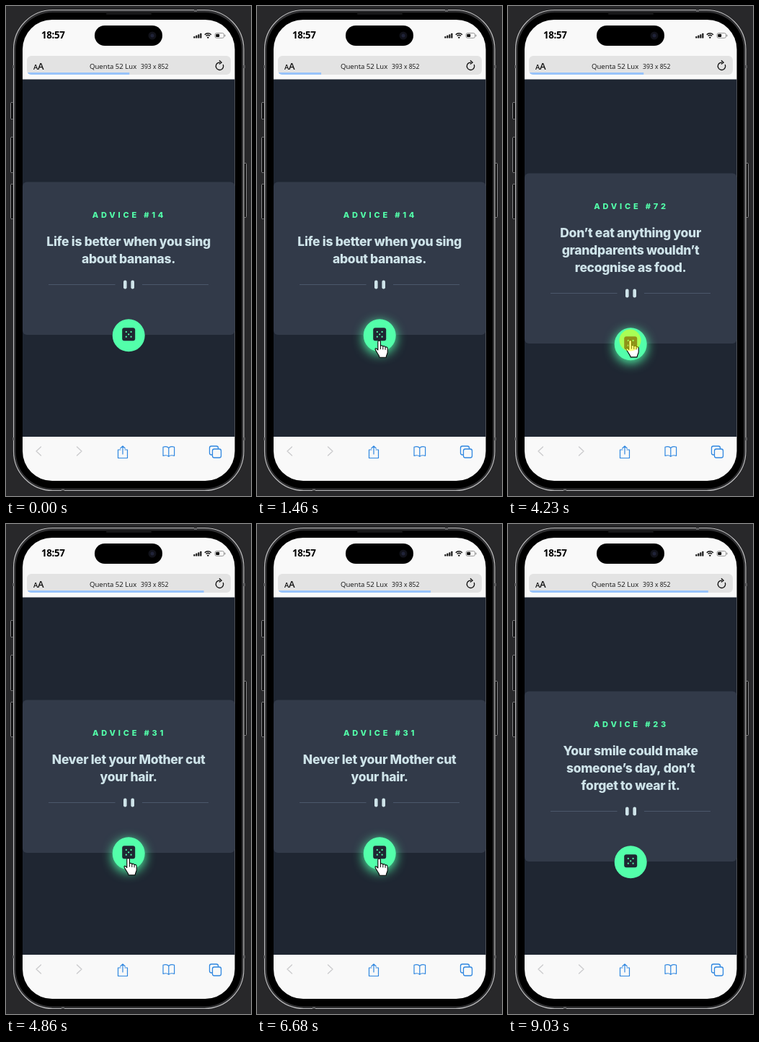
These frames come from a looping animation (340 by 678 pixels, 9100 ms). An HTML page with a canvas:

```html
<!DOCTYPE html>
<html lang="en">
<head>
<meta charset="utf-8">
<title>Advice generator on a phone</title>
<style>
html, body { margin: 0; width: 100%; height: 100%; overflow: hidden; background: #28282a; }
canvas { display: block; width: 340px; height: 678px; }
</style>
</head>
<body>
<canvas id="stage"></canvas>
<script>
const W = 340, H = 678, LOOP = 9100;
const canvas = document.getElementById('stage');
const ctx = canvas.getContext('2d');
const dpr = window.devicePixelRatio || 1;
canvas.width = W * dpr;
canvas.height = H * dpr;

const GREEN = '#53ffaa', PALE = '#cee3e9', NIGHT = '#1f2632', BLUE = '#2f87e0';

const SLIPS = [
  { at: 0, id: 14, lines: ['Life is better when you sing', 'about bananas.'] },
  { at: 2310, id: 72, lines: ['Don’t eat anything your', 'grandparents wouldn’t', 'recognise as food.'] },
  { at: 4480, id: 31, lines: ['Never let your Mother cut', 'your hair.'] },
  { at: 7040, id: 23, lines: ['Your smile could make', 'someone’s day, don’t', 'forget to wear it.'] }
];
const CLICKS = [2000, 4160, 6830];
const CLICK_MS = 200;

// Loading bar: start times and speed in px per ms
const LOADS = [-1030, 1030, 3076, 5140, 7222];
const LOAD_SPEED = 0.137;

// Pointer keys: time, x, y
const PATH = [
  [210, 303, 601], [860, 169.5, 463], [4880, 169.5, 462.5], [5350, 223, 480],
  [5700, 223, 480], [6250, 169.5, 463], [7090, 169.5, 463], [7290, 219, 480],
  [7800, 219, 480], [8330, 296, 679]
];

const last = (list, test) => list.filter(test).pop();
const ease = p => p * p * (3 - 2 * p);

function pointerAt(t) {
  for (let i = 1; i < PATH.length; i++) {
    const [t0, x0, y0] = PATH[i - 1], [t1, x1, y1] = PATH[i];
    if (t >= t0 && t < t1) {
      const p = ease((t - t0) / (t1 - t0));
      return { x: x0 + (x1 - x0) * p, y: y0 + (y1 - y0) * p };
    }
  }
  return null;
}

function box(x, y, w, h, r, fill, stroke, width = 1) {
  ctx.beginPath();
  ctx.roundRect(x, y, w, h, r);
  paint(fill, stroke, width);
}

function disc(x, y, r, fill) {
  ctx.beginPath();
  ctx.arc(x, y, r, 0, Math.PI * 2);
  paint(fill);
}

function shape(d, fill, stroke, width = 1) {
  const path = new Path2D(d);
  if (fill) { ctx.fillStyle = fill; ctx.fill(path); }
  if (stroke) { ctx.strokeStyle = stroke; ctx.lineWidth = width; ctx.stroke(path); }
}

function paint(fill, stroke, width) {
  if (fill) { ctx.fillStyle = fill; ctx.fill(); }
  if (stroke) { ctx.strokeStyle = stroke; ctx.lineWidth = width; ctx.stroke(); }
}

function text(str, x, y, font, color, align = 'left', spacing = 0) {
  ctx.font = font;
  ctx.fillStyle = color;
  ctx.textAlign = align;
  ctx.letterSpacing = spacing + 'px';
  ctx.fillText(str, x, y);
  ctx.letterSpacing = '0px';
}

function drawBody() {
  ctx.fillStyle = '#28282a';
  ctx.fillRect(0, 0, W, H);
  for (const [x, y, h] of [[6.5, 133.5, 23], [6.5, 181.5, 49], [6.5, 246.5, 48], [329.5, 217.5, 75]])
    box(x, y, 4, h, 1, '#0c0c0d', '#8a8a8c');
  box(9.5, 4.5, 321.5, 667, 55.5, '#111');
  box(10.5, 5.5, 319.5, 665, 54.5, '#303032', '#bdbdbf', 1.2);
  box(13.5, 9, 313.5, 658.5, 51, '#000');
  ctx.fillStyle = '#5a5a5c';
  for (const [x, y] of [[9, 82], [9, 597], [329, 82], [329, 597]]) ctx.fillRect(x, y, 3, 4);
  ctx.fillRect(261, 5, 4, 3);
  ctx.fillRect(77, 668, 4, 3);
  box(139, 10, 63, 1.5, 0.7, '#252527');
  box(23, 19, 294.5, 638, 41, '#f9f9f9');
}

function drawStatus() {
  text('18:57', 49, 45, 'bold 13.3px "Open Sans", sans-serif', '#000', 'left', -0.3);
  box(123, 27, 94, 28, 14, '#000');
  disc(203, 41, 5.5, '#11121a');
  disc(203, 41, 2.5, '#202338');
  for (let i = 0; i < 4; i++) box(260.3 + i * 3, 42 - i * 1.4, 2.1, 2.6 + i * 1.4, 0.5, '#111');
  ctx.lineWidth = 1.5;
  ctx.strokeStyle = '#111';
  for (const r of [6.2, 3.7]) {
    ctx.beginPath();
    ctx.arc(280.3, 44, r, -Math.PI * 0.76, -Math.PI * 0.24);
    ctx.stroke();
  }
  disc(280.3, 43.6, 1.2, '#111');
  box(290, 37.5, 12.5, 6.8, 2.2, null, '#8c8c8c', 0.9);
  box(291.2, 38.7, 5, 4.4, 1, '#111');
  box(303.4, 39.6, 1.1, 2.6, 0.5, '#8c8c8c');
}

function drawAddress(t) {
  box(29, 69, 283, 26, 6, '#e3e3e3');
  ctx.save();
  ctx.beginPath();
  ctx.roundRect(29, 69, 283, 26, 6);
  ctx.clip();
  ctx.fillStyle = '#98c3fa';
  ctx.fillRect(30, 92, (t - last(LOADS, s => s <= t)) * LOAD_SPEED, 3);
  ctx.restore();
  text('A', 38, 87.5, '600 9.5px "Open Sans", sans-serif', '#111');
  text('A', 44, 87.5, '600 13px "Open Sans", sans-serif', '#111');
  text('Quenta 52 Lux', 116, 87, '9.6px "Open Sans", sans-serif', '#111');
  text('393 x 852', 187, 87, '8.6px "Open Sans", sans-serif', '#111');
  ctx.beginPath();
  ctx.arc(296.5, 83.3, 5.2, -0.45, Math.PI * 1.55);
  paint(null, '#111', 1.3);
  shape('M296 75.2 L299.2 78.2 L295.8 80.6', null, '#111', 1.2);
}

function drawToolbar() {
  ctx.save();
  ctx.translate(0, -0.5);
  ctx.lineJoin = ctx.lineCap = 'round';
  shape('M48.5 610.5 L42 616.5 L48.5 622.5 M98.5 610.5 L105 616.5 L98.5 622.5', null, '#cbcbcd', 1.3);
  shape('M159 614.5 H155.5 V626 H168.5 V614.5 H165 M162 620.5 V609.5 M158.8 612.5 L162 609.3 L165.2 612.5', null, BLUE, 1.2);
  shape('M225.8 612 C224 610 220.5 610 218 610.8 V622.8 C221 622 224 622 225.8 623.8 C227.6 622 230.6 622 233.6 622.8 V610.8 C231 610 227.6 610 225.8 612 V623.5', null, BLUE, 1.2);
  box(282.5, 609.5, 12, 12, 2.5, null, BLUE, 1.3);
  box(286.5, 613.5, 12, 12, 2.5, '#f9f9f9', BLUE, 1.3);
  ctx.restore();
}

function drawButton(cy, hover) {
  ctx.save();
  if (hover) {
    ctx.shadowColor = GREEN;
    ctx.shadowBlur = 15 * dpr;
    ctx.shadowOffsetY = 3.5 * dpr;
  }
  disc(170.2, cy, 22.5, GREEN);
  ctx.restore();
  box(161.2, cy - 10.5, 18, 18, 3, NIGHT);
  for (const [dx, dy] of [[0, 0], [-1, -1], [1, -1], [-1, 1], [1, 1]])
    disc(170.2 + dx * 3.4, cy - 1.5 + dy * 3.4, 1.1, GREEN);
}

function drawCard(t, pointer) {
  ctx.fillStyle = NIGHT;
  ctx.fillRect(23, 101.5, 294.5, 494.5);
  const slip = last(SLIPS, s => s.at <= t);
  const rows = slip.lines.length;
  const top = 267.5 - rows * 12, height = 163.5 + rows * 24;
  const cy = top + height + 0.8;
  box(23, top, 294.5, height, 6, '#323a49');
  text('ADVICE #' + slip.id, 171, top + 49.5, '800 11px Inter, sans-serif', GREEN, 'center', 3.8);
  slip.lines.forEach((line, i) =>
    text(line, 170.1, top + 88.5 + i * 24, '800 17.5px Inter, sans-serif', PALE, 'center', -0.32));
  const mid = top + 94 + rows * 24;
  ctx.fillStyle = '#4b576b';
  ctx.fillRect(59, mid - 0.5, 92.5, 1);
  ctx.fillRect(189, mid - 0.5, 92, 1);
  box(163, mid - 6, 4.6, 12, 2.2, PALE);
  box(173.4, mid - 6, 4.6, 12, 2.2, PALE);

  const hover = pointer && Math.hypot(pointer.x - 170, pointer.y - cy) < 22.5;
  drawButton(cy, hover);
  return hover;
}

function drawPointer({ x, y }, hand) {
  ctx.save();
  ctx.translate(x, y);
  ctx.lineJoin = 'round';
  if (hand) {
    shape('M-1.7 13 V1.6 C-1.7 -.5 1.9 -.5 1.9 1.6 V7.6 C2.4 6.4 5.2 6.6 5.3 8.3 C6.2 7.2 8.5 7.6 8.6 9.3 C9.6 8.5 11.7 9 11.7 10.9 V16 C11.7 18.4 9.8 20 9.6 23.3 H.6 C.4 20.5 -2.2 18.6 -3.7 15.3 C-4.5 13.9 -5.6 12.7 -5.5 11.6 C-5 9.9 -3 11 -1.7 13 Z', '#fff', '#000', 1.1);
    shape('M1.9 7.8 V12 M5.3 8.6 V12.4 M8.6 9.6 V12.8', null, '#000', 1);
  } else {
    shape('M.5 .5 V16.6 L4.2 13.2 L6.7 18.9 L9.3 17.8 L6.9 12.2 H11.7 Z', '#fff', '#000', 1);
  }
  ctx.restore();
}

function draw(t) {
  ctx.setTransform(dpr, 0, 0, dpr, 0, 0);
  const pointer = pointerAt(t);
  drawBody();
  drawStatus();
  drawAddress(t);
  drawToolbar();
  const hover = drawCard(t, pointer);
  if (!pointer) return;
  drawPointer(pointer, hover);
  if (CLICKS.some(c => t >= c && t < c + CLICK_MS))
    disc(pointer.x, pointer.y, 15, 'rgba(255, 255, 0, 0.5)');
}

const start = performance.now();
function tick() {
  draw((performance.now() - start) % LOOP);
  requestAnimationFrame(tick);
}
tick();
</script>
</body>
</html>
```
